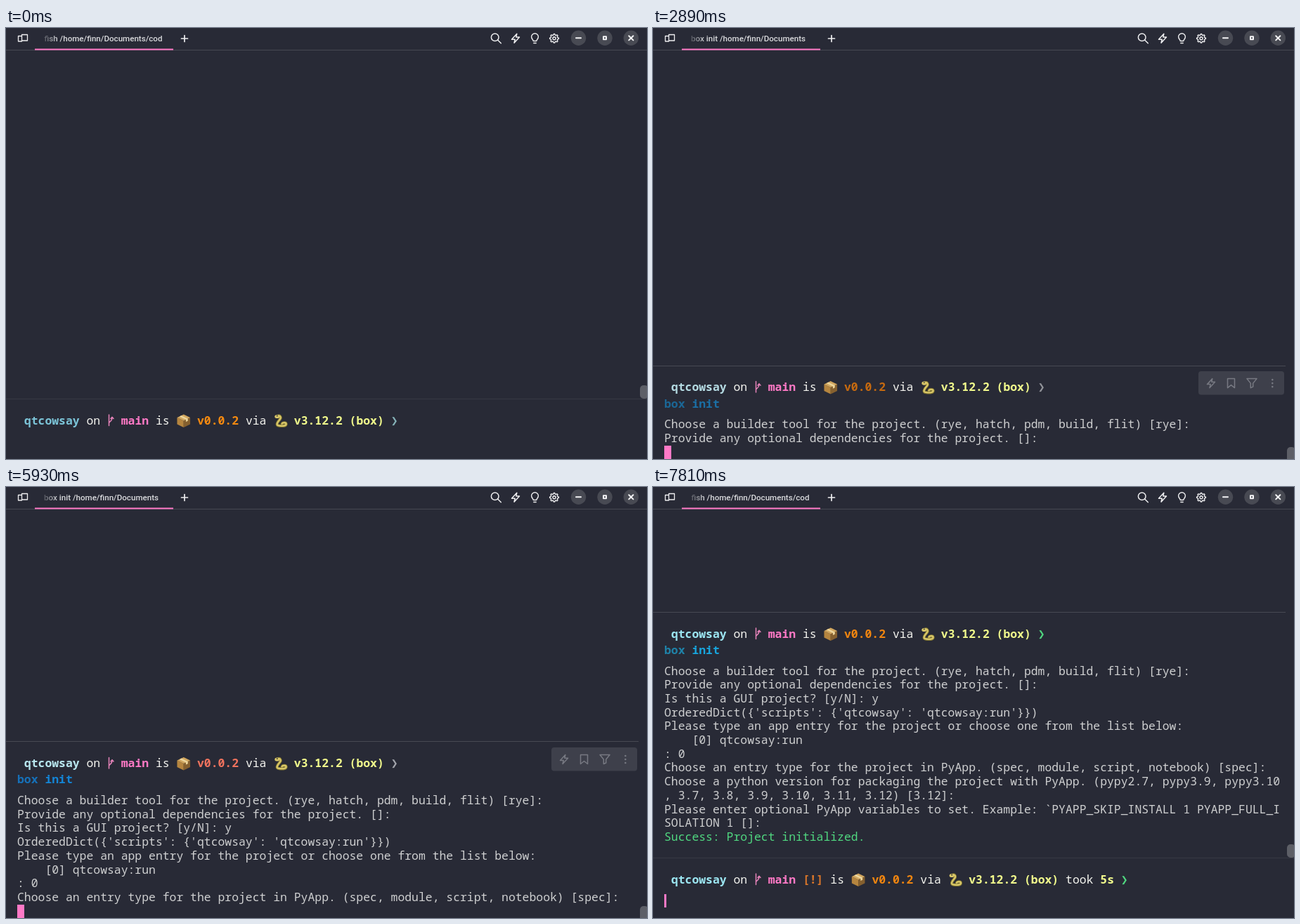
An HTML page that plays this animation: 912 by 614 pixels, repeating every 8 s.

```html
<!DOCTYPE html>
<html lang="en">
<head>
<meta charset="utf-8">
<title>Terminal session</title>
<style>
html, body { margin: 0; width: 100%; height: 100%; overflow: hidden; background: #282a36; }
svg { display: block; width: 912px; height: 614px; }
text { white-space: pre; }
.mono { font: 16.41px "Noto Sans Mono", "DejaVu Sans Mono", monospace; fill: #cfd0d1; }
.bold { font-weight: 700; }
.arrow { font: 16.4px "DejaVu Sans Mono", monospace; }
.tab { font: 500 11.6px Roboto, sans-serif; text-anchor: end; }
.line { fill: none; stroke-linecap: round; stroke-linejoin: round; }
</style>
</head>
<body>
<svg viewBox="0 0 912 614" xmlns="http://www.w3.org/2000/svg">
  <defs>
    <linearGradient id="fade" gradientUnits="userSpaceOnUse" x1="48" y1="0" x2="74" y2="0">
      <stop offset="0" stop-color="#d9dadd" stop-opacity="0"/>
      <stop offset="1" stop-color="#d9dadd"/>
    </linearGradient>
    <g id="package">
      <path d="M-9.3-4.5L0 0V9.5L-9.3 5Z" fill="#b5853f"/>
      <path d="M9.3-4.5L0 0V9.5L9.3 5Z" fill="#85602f"/>
      <path d="M-9.3-4.5L0-9L9.3-4.5L0 0Z" fill="#d2a75f"/>
      <path d="M-6-6.1L-3.2-7.4L6-3V.2L3.2 1.6V-1.6Z" fill="#ecd59c"/>
    </g>
    <g id="snake" class="line">
      <path id="coil" d="M-5-6C0-8.5 1.5-4-1.5-1C-5 3-7 7-2 7.3C4 8 8 7.5 8 5C8 2.5 3 2.5 2 4.5" stroke="#7c7230" stroke-width="3.8"/>
      <use href="#coil" y="-.4"/>
      <path d="M-5-6.3C0-8.8 1.5-4.3-1.5-1.3C-5 2.7-7 6.7-2 7C4 7.7 8 7.2 8 4.7C8 2.2 3 2.2 2 4.2" stroke="#d8c668" stroke-width="2.4"/>
      <ellipse cx="-4.8" cy="-6" rx="3.5" ry="2.6" fill="#d8c668"/>
      <circle cx="-4.8" cy="-7" r=".9" fill="#333"/>
    </g>
    <path id="bolt" d="M1.8-6.5L-5.5 1.5H-.8L-2 6.5L5.5-1.8H.8Z"/>
  </defs>

  <g class="line" stroke="#eeeef0" stroke-width="1.5">
    <path d="M22.5 11.5H17.5V19H22.5M22.5 9.5H30.5V18H22.5Z" stroke-width="1.3"/>
    <path d="M249.5 15H258.5M254 10.5V19.5" stroke-width="1.7"/>
    <circle cx="695.7" cy="13.2" r="5.3"/>
    <path d="M699.7 17.2L704.3 21.7"/>
    <use href="#bolt" x="725" y="14.8"/>
    <path d="M750.2 18.5C750.2 16.5 747.6 15.8 747.6 12.6A4.9 4.9 0 0 1 757.4 12.6C757.4 15.8 754.8 16.5 754.8 18.5ZM750.8 21.5H754.2" stroke-width="1.4"/>
    <g transform="translate(780 14.8)" stroke-width="1.4">
      <path id="gear"/>
      <circle r="2"/>
    </g>
  </g>
  <g fill="#484a53">
    <circle cx="814.5" cy="14.3" r="10.7"/>
    <circle cx="852" cy="14.3" r="10.7"/>
    <circle cx="889.3" cy="14.3" r="10.7"/>
  </g>
  <g class="line" stroke="#f4f4f6" stroke-width="2">
    <path d="M811 14.3H818M886.2 11.2L892.4 17.4M892.4 11.2L886.2 17.4"/>
    <rect x="850" y="12.3" width="4" height="4"/>
  </g>
  <rect y="31" width="912" height="1" fill="#474953"/>
  <rect x="41" y="29.5" width="197" height="2" fill="#ff79c6"/>
  <text id="title" class="tab" y="19" fill="url(#fade)"></text>
  <g id="screen"></g>
</svg>
<script>
const LOOP = 8000, LEFT = 16, ADV = 9.846, ROW = 19.69;
const PINK = '#ff79c6', CMD = 'box init';
const $ = id => document.getElementById(id);

const BUILDER = 'Choose a builder tool for the project. (rye, hatch, pdm, build, flit) [rye]: ';
const DEPS = 'Provide any optional dependencies for the project. []: ';
const GUI = 'Is this a GUI project? [y/N]: ';
const ENTRY = ["OrderedDict({'scripts': {'qtcowsay': 'qtcowsay:run'}})",
  'Please type an app entry for the project or choose one from the list below:',
  '    [0] qtcowsay:run', ': '];
const TYPE = 'Choose an entry type for the project in PyApp. (spec, module, script, notebook) [spec]: ';
const PYTHON = ['Choose a python version for packaging the project with PyApp. (pypy2.7, pypy3.9, pypy3.10',
  ', 3.7, 3.8, 3.9, 3.10, 3.11, 3.12) [3.12]: '];
const VARS = ['Please enter optional PyApp variables to set. Example: `PYAPP_SKIP_INSTALL 1 PYAPP_FULL_I',
  'SOLATION 1 []: '];

// Each event appends to the current output row; '\n' opens a new one.
const OUTPUT = [
  [1930, BUILDER], [2430, '\n'], [2480, DEPS], [2890, '\n'], [3310, GUI], [3850, 'y'],
  [4350, '\n'], [4390, ENTRY.join('\n')], [4810, '0'], [5390, '\n'], [5480, TYPE],
  [5930, '\n'], [6230, PYTHON.join('\n')], [6770, '\n'], [7140, VARS.join('\n')],
  [7560, '\n'], [7730, 'Success: Project initialized.']
];

// Prompt tints: time, directory, version, arrow, command, argument
const TINTS = [
  [0, '#7cc4d8', '#f68a10', '#86b3b9', '#1166c0', '#1485d6'],
  [1680, '#8be9fd', '#ee8310', '#62bd9b', '#1268bd', '#1485d6'],
  [2430, '#b5dbe3', '#c66a10', '#93959b', '#1b6796', '#1b6fa5'],
  [4350, '#8bdcf5', '#ee8310', '#93959b', '#2c7880', '#5bcbe8'],
  [5390, '#b8e6ee', '#f0735e', '#a3a5ac', '#1670b8', '#1485d6'],
  [6230, '#8be9fd', '#e08313', '#46a574', '#1583c8', '#1a9fe0'],
  [7730, '#9ce6f2', '#f08510', '#50d880', '#1f82a8', '#18a5dd']
];

const col = n => LEFT + n * ADV;
const esc = s => s.replace(/&/g, '&amp;').replace(/</g, '&lt;');
const text = (n, y, s, fill, bold) =>
  `<text class="mono${bold ? ' bold' : ''}" x="${col(n)}" y="${y}"${fill ? ` style="fill:${fill}"` : ''}>${esc(s)}</text>`;
const rect = (x, y, w, h, fill, r = 0) =>
  `<rect x="${x}" y="${y}" width="${w}" height="${h}" rx="${r}" fill="${fill}"/>`;
const stroke = (d, color, w) => `<path class="line" d="${d}" stroke="${color}" stroke-width="${w}"/>`;

function prompt(mid, tint, dirty) {
  const y = mid + 5.8, shift = dirty ? 4 : 0, plain = '#f5f5f0', yellow = '#f1fa8c';
  const icon = (id, n) => `<use href="#${id}" x="${col(n) + 10.3}" y="${mid + .5}"/>`;
  return text(1, y, 'qtcowsay', tint[1], 1) + text(10, y, 'on', plain)
    + stroke(`M146.5 ${mid - 8}V${mid + 7.5}M146.5 ${mid + 4}C146.5 ${mid + 1} 151 ${mid + 2} 151 ${mid - 4}M149 ${mid - 2.5}L151 ${mid - 4.8}L153 ${mid - 2.5}`, '#e583b9', 1.5)
    + text(15, y, 'main', PINK, 1)
    + (dirty ? text(20, y, '[!]', '#d9762a', 1) : '')
    + text(20 + shift, y, 'is', plain) + icon('package', 23 + shift)
    + text(26 + shift, y, 'v0.0.2', tint[2], 1) + text(33 + shift, y, 'via', plain)
    + icon('snake', 37 + shift) + text(40 + shift, y, 'v3.12.2 (box)', yellow, 1)
    + (dirty ? text(58, y, 'took', plain) + text(63, y, '5s', yellow, 1) : '')
    + `<text class="arrow" x="${col(dirty ? 66 : 54)}" y="${y}" fill="${tint[3]}">❯</text>`;
}

function command(y, s, tint) {
  return text(0, y, s.slice(0, 3), tint[4], 1) + text(4, y, s.slice(4), tint[5], 1);
}

function toolbar(top) {
  const y = top + 25;
  return rect(776, top + 8, 122, 33.5, '#3e404b', 4)
    + `<g class="line" stroke="#777982" stroke-width="1.5"><use href="#bolt" x="794" y="${y}"/>`
    + `<path d="M817.5 ${y - 6.5}H827.5V${y + 6.5}L822.5 ${y + 2.5}L817.5 ${y + 6.5}ZM845 ${y - 6.5}H859L853.7 ${y}V${y + 5}L850.3 ${y + 6.5}V${y}Z"/></g>`
    + [-5, 0, 5].map(d => `<circle cx="881.3" cy="${y + d}" r="1.3" fill="#777982"/>`).join('');
}

function block(top, rows, tint) {
  return rect(0, Math.round(top - .5), 900, 1, '#474953') + prompt(top + 30.5, tint)
    + command(top + 59.5, CMD, tint)
    + rows.map((s, i) => text(0, top + 89.1 + i * ROW, s, s.startsWith('Success') && '#50d880')).join('');
}

function input(mid, tint, typed, cursor, dirty) {
  return rect(0, 528, 912, 1, '#373944') + prompt(mid, tint, dirty) + command(595, typed, tint)
    + (cursor ? rect(col(typed.length), 580, 3, 19, PINK) : '')
    + rect(902, 509, 12, 19, '#5d5f67', 5);
}

function screen(t) {
  const tint = TINTS.filter(p => p[0] <= t).pop();
  if (t < 1680) {
    const count = t < 640 ? 0 : Math.min(8, 1 + Math.floor((t - 640) / 107));
    return input(559, tint, CMD.slice(0, count), t >= 270);
  }
  const rows = OUTPUT.filter(e => e[0] <= t).map(e => e[1]).join('').split('\n');
  if (t >= 7730) return block(178.5, rows, tint) + input(559, tint, '', true, t >= 7810);
  const started = t >= 1810, last = rows.length - 1;
  const top = 520.5 - (started ? last : -1) * ROW;
  const cursor = started ? rect(col(rows[last].length), 595, 10, 19, PINK) : '';
  return block(top, rows, tint) + toolbar(top) + cursor + rect(902, 597, 12, 22, '#5d5f67', 5);
}

function gearPath() {
  const points = [];
  for (let i = 0; i < 32; i++) {
    const a = (i - .5) * Math.PI / 16, r = i % 4 < 2 ? 6.4 : 4.9;
    points.push(`${(r * Math.cos(a)).toFixed(2)} ${(r * Math.sin(a)).toFixed(2)}`);
  }
  return `M${points.join('L')}Z`;
}

let shown = '';
function draw(now) {
  const t = now % LOOP, running = t >= 1740 && t < 7810;
  const title = running ? 'box init /home/finn/Documents' : 'fish /home/finn/Documents/cod';
  const markup = screen(t);
  if (markup + title !== shown) {
    shown = markup + title;
    $('title').textContent = title;
    $('title').setAttribute('x', running ? 217 : 222.5);
    $('screen').innerHTML = markup;
  }
}

$('gear').setAttribute('d', gearPath());
const start = performance.now();
function tick() {
  draw(performance.now() - start);
  requestAnimationFrame(tick);
}
tick();
</script>
</body>
</html>
```
